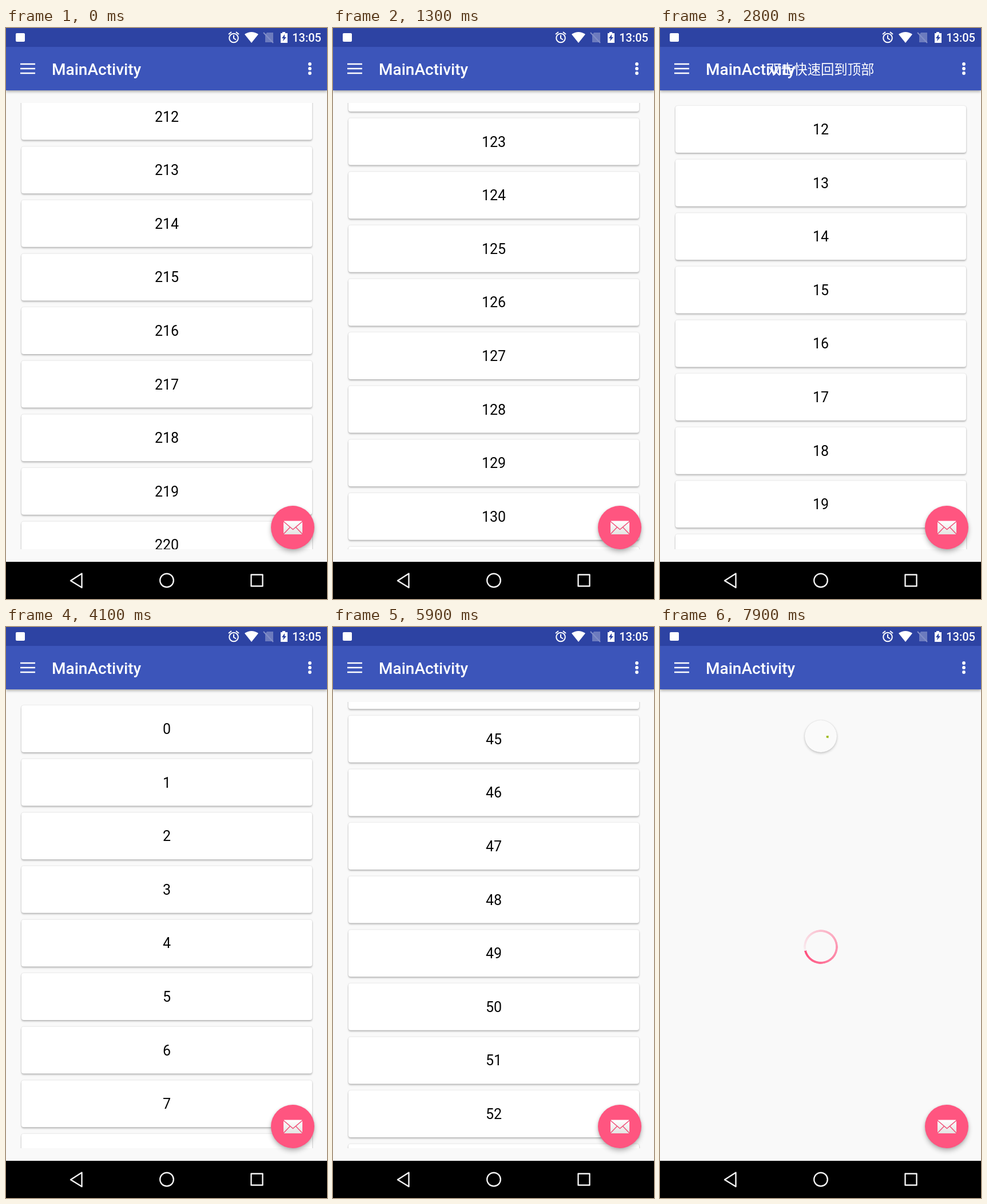
An HTML page that plays this animation: 561x998 px, repeating every 8000 ms.

```html
<!DOCTYPE html>
<html lang="en">
<head>
<meta charset="utf-8">
<title>List screen</title>
<style>
html, body { margin: 0; width: 100%; height: 100%; overflow: hidden; background: #f9f9f9; }
body { position: relative; font-family: Roboto, sans-serif; }
.layer { position: absolute; left: 0; top: 0; }
#list { position: absolute; left: 19px; top: 131px; width: 524px; height: 780px; overflow: hidden; }
.card {
  position: absolute; left: 8px; top: 0; width: 508px; height: 82px;
  border-radius: 4px; background: #fff; color: #050505;
  box-shadow: 0 2px 3px rgba(0,0,0,.26), 0 0 2px rgba(0,0,0,.16);
  font-size: 24.93px; line-height: 84px; text-align: center;
}
#bar {
  position: absolute; left: 0; top: 0; width: 561px; height: 109px;
  background: linear-gradient(#2d43a3 33px, #3c55ba 33px);
  box-shadow: 0 2px 5px rgba(0,0,0,.35);
}
#refresh {
  position: absolute; left: 253px; top: 163px; width: 56px; height: 56px;
  border-radius: 50%; background: #fafafa;
  box-shadow: 0 2px 4px rgba(0,0,0,.2), 0 0 2px rgba(0,0,0,.12);
}
#spinner {
  position: absolute; left: 251px; top: 529px; width: 60px; height: 60px; border-radius: 50%;
  background: conic-gradient(rgba(255,77,124,.06), #ff4d7c);
  -webkit-mask: radial-gradient(circle, transparent 25.6px, #000 26.4px);
  mask: radial-gradient(circle, transparent 25.6px, #000 26.4px);
}
#fab {
  position: absolute; left: 463px; top: 835px; width: 76px; height: 76px;
  border-radius: 50%; background: #ff5580;
  box-shadow: 0 5px 8px rgba(0,0,0,.24), 0 1px 4px rgba(0,0,0,.12);
}
</style>
</head>
<body>
<div id="list"></div>
<div id="loading">
  <div id="refresh">
    <svg width="56" height="56" viewBox="-28 -28 56 56">
      <circle id="arc" r="11.7" fill="none" stroke-width="4" pathLength="360"/>
    </svg>
  </div>
  <div id="spinner"></div>
</div>
<div id="bar"></div>
<div id="fab"></div>
<svg class="layer" width="561" height="998" viewBox="0 0 561 998">
  <defs>
    <linearGradient id="paper" x2="0" y2="1">
      <stop stop-color="#fff"/><stop offset="1" stop-color="#e4e4e2"/>
    </linearGradient>
  </defs>

  <!-- status bar -->
  <g fill="#fff">
    <rect x="17" y="9" width="16" height="15" rx="2"/>
    <path d="M417 11Q429 3 441 11L429 26Z"/>
    <path d="M483 7h5v2h4v17h-12V9h3z"/>
    <text x="551" y="24" font-size="20" font-weight="500" text-anchor="end">13:05</text>
  </g>
  <path d="M487 11l-5 7h3l-1 5 6-7h-3z" fill="#2d43a3"/>
  <g fill="none" stroke="#fff" stroke-width="2">
    <circle cx="398" cy="17.5" r="7.8"/>
    <path d="M398 12.5v5.5l4 2.5M389 11l5-4M407 11l-5-4"/>
  </g>
  <g opacity=".4">
    <path d="M456 8h11v17h-14V12z" fill="#fff" opacity=".75"/>
    <path d="M450 8l17 18" stroke="#fff" stroke-width="2"/>
  </g>

  <!-- toolbar -->
  <path d="M25 63h26M25 71h26M25 79h26" stroke="#fff" stroke-width="2.6"/>
  <g fill="#fff">
    <circle cx="531" cy="63" r="2.9"/><circle cx="531" cy="71" r="2.9"/><circle cx="531" cy="79" r="2.9"/>
    <text x="80" y="81.5" font-size="28" font-weight="500">MainActivity</text>
    <text id="hint" x="281" y="80.5" font-size="23.37" text-anchor="middle" font-family="'Noto Sans CJK SC','Noto Sans CJK',sans-serif" lang="zh">双击快速回到顶部</text>
  </g>

  <!-- envelope -->
  <rect x="485" y="861.5" width="33" height="23.5" rx="1.5" fill="url(#paper)"/>
  <path d="M485 862.5l16.5 14 16.5-14M485 884.5l11.5-12M518 884.5l-11.5-12" fill="none" stroke="#f0557c" stroke-width="1.6"/>

  <!-- navigation bar -->
  <rect y="933" width="561" height="65"/>
  <g fill="none" stroke="#f4f4f4" stroke-width="2.4" stroke-linejoin="round">
    <path d="M113 966l19.5-12.5v24.5z"/>
    <circle cx="281" cy="965.5" r="11.8"/>
    <rect x="428.5" y="955.5" width="20" height="20"/>
  </g>
</svg>
<script>
const LOOP = 8000, STEP = 100, PITCH = 93.6, CYCLE = 1332;
const CLEARED = 7000, DOT = 7900;
// time, first visible position, whether the way there slows down
const scroll = [
  [0, 212.25], [700, 163.52], [2000, 75.25], [2800, 12.01], [3200, 0, true],
  [4300, 0], [4600, 5], [5900, 44.81], [6600, 55, true], [LOOP, 55]
];
const $ = id => document.getElementById(id);
const clamp = x => Math.min(1, Math.max(0, x));
const smooth = x => { x = clamp(x); return x * x * (3 - 2 * x); };
const mix = (a, b, k) => a + (b - a) * k;

const cards = Array.from({ length: 10 }, () => {
  const card = document.createElement('div');
  card.className = 'card';
  return $('list').appendChild(card);
});

function positionAt(t) {
  const i = scroll.findIndex(k => k[0] > t);
  const [t0, p0] = scroll[i - 1], [t1, p1, slows] = scroll[i];
  const k = (t - t0) / (t1 - t0);
  return mix(p0, p1, slows ? 1 - (1 - k) ** 2 : k);
}

function drawList(t) {
  const pos = positionAt(t), first = Math.floor(pos);
  cards.forEach((card, i) => {
    card.textContent = first + i;
    card.style.transform = `translateY(${6 + PITCH * (first + i - pos)}px)`;
  });
}

function drawLoading(t) {
  const turns = (t - DOT) / CYCLE, whole = Math.floor(turns), p = turns - whole;
  const start = 288 * smooth(2 * p - 1);
  const length = 288 * smooth(2 * p) + 18 - start;
  const shift = turns < 0 ? clamp((p - .75) * 4) : 1;
  const arc = $('arc');
  arc.setAttribute('stroke', `rgb(${mix(255, 158, shift)},${mix(187, 186, shift)},${mix(51, 28, shift)})`);
  arc.setAttribute('stroke-dasharray', `${length} 360`);
  arc.setAttribute('transform', `rotate(${306 * turns + 288 * whole + start - 4})`);
  $('refresh').style.transform = `scale(${smooth((t - CLEARED + STEP) / 300)})`;
  $('spinner').style.transform = `rotate(${256 + (t - DOT) * .36}deg)`;
}

function draw(now) {
  const t = Math.floor(now % LOOP / STEP) * STEP;
  const loading = t >= CLEARED;
  $('list').style.display = loading ? 'none' : 'block';
  $('loading').style.display = loading ? 'block' : 'none';
  $('hint').style.opacity = clamp((t - 2500) / 200) * clamp((3700 - t) / 200);
  if (loading) drawLoading(t); else drawList(t);
}

let begin;
function tick(now) {
  begin ??= now;
  draw(now - begin);
  requestAnimationFrame(tick);
}
draw(0);
requestAnimationFrame(tick);
</script>
</body>
</html>
```
